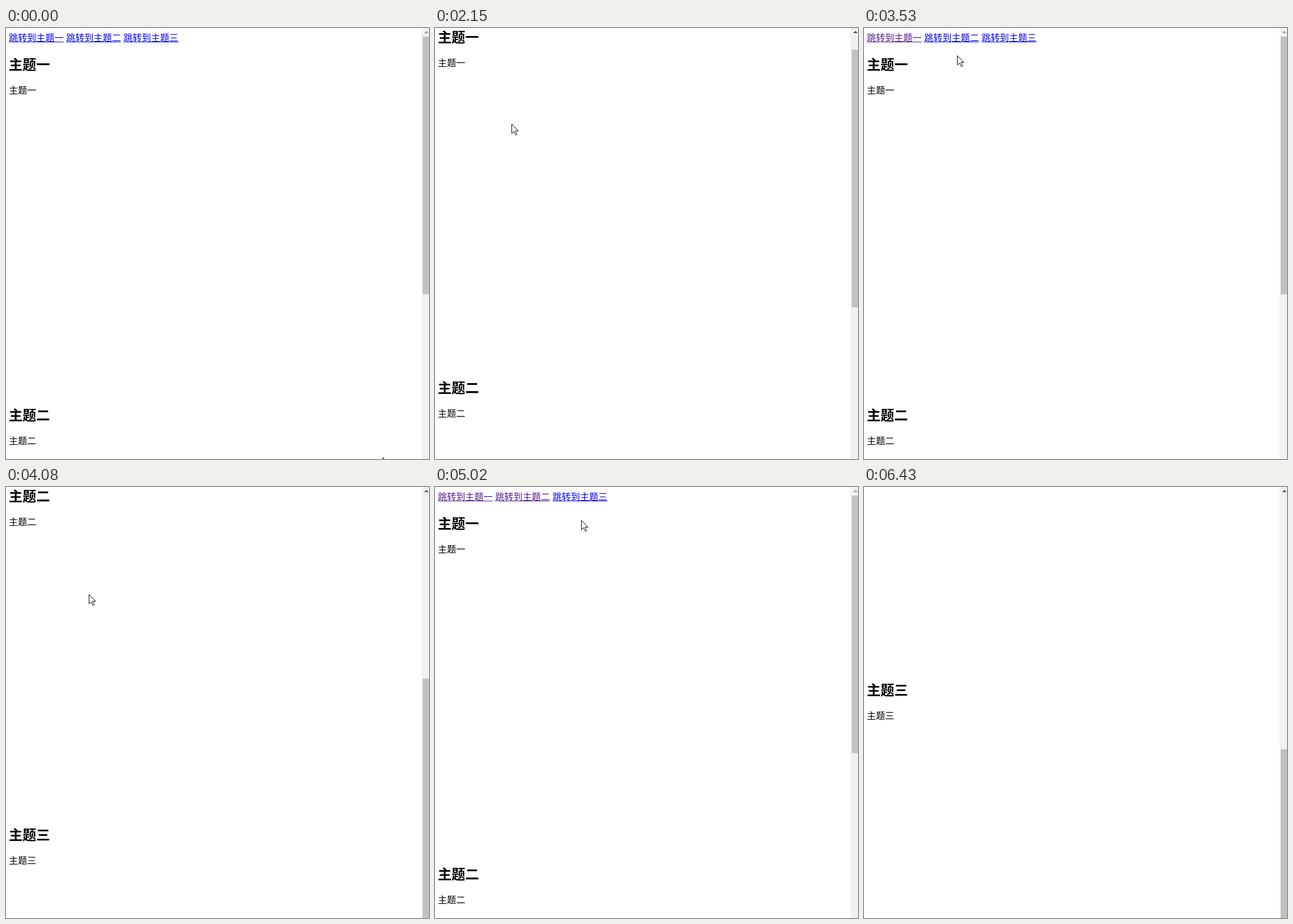
These frames come from a looping animation (741x756 px, 7.12 s). An HTML page:

```html
<!DOCTYPE html>
<html lang="zh-CN">
<head>
<meta charset="utf-8">
<title>锚点跳转</title>
<style>
html, body { margin: 0; width: 100%; height: 100%; overflow: hidden; background: #fff; }
svg { display: block; }
text { font: 16px "Noto Sans CJK SC", "Noto Sans CJK", sans-serif; }
.heading { font-size: 24px; font-weight: bold; }
.pointer { fill: #fff; stroke: #000; stroke-width: 1; }
</style>
</head>
<body>
<svg width="741" height="756" viewBox="0 0 741 756">
  <rect width="741" height="756" fill="#fff"/>
  <g id="page"></g>
  <rect x="728" width="13" height="756" fill="#f1f1f1"/>
  <path id="upArrow" d="M732.5 9L736.5 5L740.5 9z"/>
  <rect id="thumb" x="730" width="11" height="452" fill="#c1c1c1"/>
  <g id="cursor">
    <circle id="glow" cy="1" r="11.5" fill="#ff0" opacity=".55"/>
    <path id="arrow" class="pointer" d="M1.5 1.5V18L5.3 14.4L8.3 20.7Q9.6 21.7 10.7 19.7L7.8 13.4H13z"/>
    <path id="hand" class="pointer" d="M-.5 13V2Q-.5 .5 1 .5T2.5 2V7Q4 5.5 5.5 7.5Q7.5 6.3 8.5 8.5Q11.5 7.8 11.5 10.5V15L9.5 18.5V21.5H1.5V19L-4.5 12Q-5 9.5-2.5 10.3zM2.5 7V11M5.5 7.5V11M8.5 8.5V11.5"/>
    <path id="beam" d="M-3 -8.5H-1L0 -7.5L1 -8.5H3M0 -7.5V7.5M-3 8.5H-1L0 7.5L1 8.5H3" fill="none" stroke="#000"/>
  </g>
</svg>
<script>
const LOOP = 7120;
const TICK = 77;          // time between screen updates
const HOLD = 150;         // how long a link stays pressed
const WHEEL = 107.8;      // pixels scrolled back per tick
const MAX_SCROLL = 917;
const THUMB_RATIO = 0.4848;

const $ = id => document.getElementById(id);
const page = $('page');

function add(tag, attrs, content = '') {
  const el = document.createElementNS('http://www.w3.org/2000/svg', tag);
  for (const key in attrs) el.setAttribute(key, attrs[key]);
  el.textContent = content;
  return page.appendChild(el);
}

const topics = [
  { name: '主题一', y: 73, press: 1310, back: 2300 },
  { name: '主题二', y: 688, press: 3610, back: 4155 },
  { name: '主题三', y: 1282, press: 5420, back: LOOP }
];

topics.forEach((topic, i) => {
  const x = 5 + 100.45 * i;
  topic.link = [
    add('text', { x, y: 23 }, '跳转到' + topic.name),
    add('rect', { x: Math.round(x), y: 24, width: 96, height: 1 })
  ];
  topic.target = { x: 59 + 100 * i, y: 19 };
  topic.jump = topic.press + HOLD;
  add('text', { x: 5, y: topic.y, class: 'heading' }, topic.name);
  add('text', { x: 5, y: topic.y + 42 }, topic.name);
});

// Straight cursor moves, one step per tick.
const [first, second, third] = topics.map(topic => topic.target);
const home = { x: 659, y: 752 };
const moves = [
  { at: 70, steps: 5, to: { x: 369, y: 154 } },
  { at: 530, steps: 9, to: first },
  { at: 1840, steps: 9, to: { x: 192, y: 285 } },
  { at: 2780, steps: 1, to: { x: 185, y: 297 } },
  { at: 2857, steps: 10, to: second },
  { at: 3760, steps: 5, to: { x: 144, y: 187 } },
  { at: 4145, steps: 6, to: { x: 158, y: 342 } },
  { at: 4615, steps: 6, to: { x: 255, y: 57 } },
  { at: 5085, steps: 3, to: third },
  { at: 5880, steps: 8, to: { x: 758, y: 843 } }
];

const ticksSince = (t, at) => Math.max(0, Math.floor((t - at) / TICK));

function cursorAt(t) {
  const i = moves.findLastIndex(move => move.at <= t);
  if (i < 0) return home;
  const { at, steps, to } = moves[i];
  const from = i ? moves[i - 1].to : home;
  const u = Math.min(1, (ticksSince(t, at) + 1) / steps);
  const mix = axis => Math.round(from[axis] + (to[axis] - from[axis]) * u);
  return { x: mix('x'), y: mix('y') };
}

function scrollAt(t) {
  const topic = topics.findLast(({ jump }) => jump <= t);
  if (!topic) return 0;
  const anchor = Math.min(topic.y - 25, MAX_SCROLL);
  return Math.max(0, Math.round(anchor - WHEEL * ticksSince(t, topic.back)));
}

const show = (id, on) => $(id).setAttribute('display', on ? 'inline' : 'none');

function draw(t) {
  const scroll = scrollAt(t);
  const { x, y } = cursorAt(t);
  const pageY = y + scroll;

  page.setAttribute('transform', `translate(0 ${-scroll})`);
  $('thumb').setAttribute('y', Math.round(15 + scroll * THUMB_RATIO));
  $('upArrow').setAttribute('fill', scroll ? '#505050' : '#a3a3a3');

  let pressed = false;
  for (const { link, press, jump } of topics) {
    const active = t >= press && t < jump;
    const color = active ? '#ff0000' : t < press ? '#0000ee' : '#551a8b';
    link.forEach(part => part.setAttribute('fill', color));
    pressed ||= active;
  }

  const overLink = x < 302 && pageY < 28;
  const overHeading = x < 77 && topics.some(topic => Math.abs(pageY - topic.y + 9) < 12);
  $('cursor').setAttribute('transform', `translate(${x} ${y})`);
  show('hand', overLink);
  show('beam', overHeading);
  show('arrow', !overLink && !overHeading);
  show('glow', pressed);
}

const start = performance.now();
function tick() {
  draw((performance.now() - start) % LOOP);
  requestAnimationFrame(tick);
}
tick();
</script>
</body>
</html>
```
